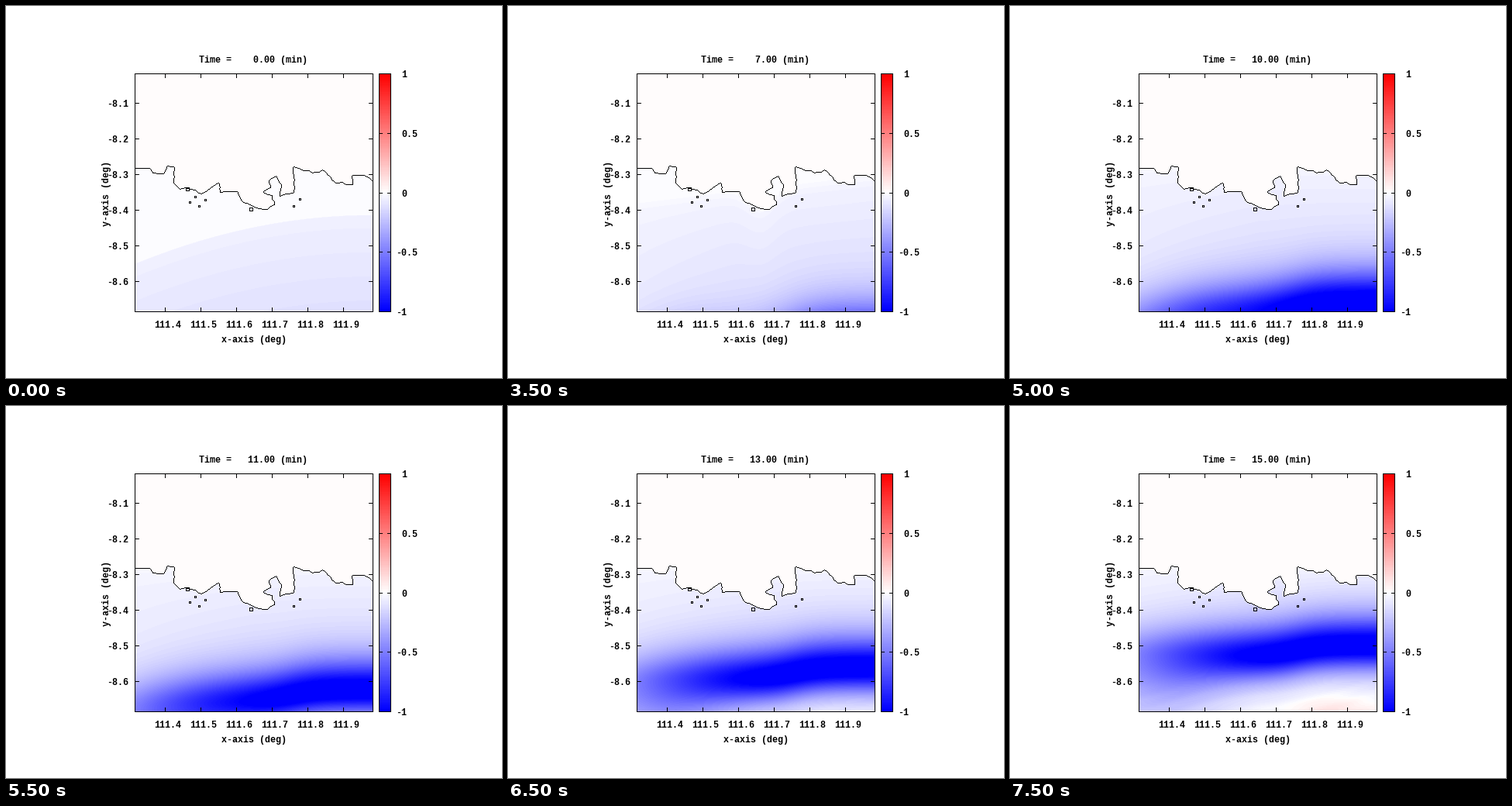
A matplotlib script for the animation above (8000 ms loop, 640 by 480 pixels).

```python
import numpy as np
import matplotlib.pyplot as plt
from matplotlib.animation import FuncAnimation
from matplotlib.path import Path

W, H, DPI = 640, 480, 100
L, R, T, B = 166, 473, 87, 394          # map frame in pixels
CB_L, CB_R = 481, 496                   # colour bar
PX = 72 / DPI

plt.rcParams.update({
    "font.family": "Liberation Mono",
    "font.weight": "bold",
    "font.size": 7 / 0.6 * PX,
})

fig = plt.figure(figsize=(W / DPI, H / DPI), dpi=DPI, facecolor="white")
ax = fig.add_axes([0, 0, 1, 1])

X, Y = np.meshgrid(np.arange(L + 1, R), np.arange(T + 1, B))
U = (X - L) / (R - L)                   # 0 at the west side, 1 at the east


def sigmoid(z):
    return 1 / (1 + np.exp(-np.clip(z, -50, 50)))


def bump(center, width):
    return np.exp(-((U - center) / width) ** 2)


def palette(v):
    """Blue-white-red in 128 steps over -1..1."""
    g = np.clip(np.floor((v + 1) * 64), 0, 127) / 127 * 2 - 1
    return np.stack([1 + np.minimum(g, 0), 1 - np.abs(g), 1 - np.maximum(g, 0)], axis=-1)


def rough(points, step=4, amount=0.7):
    """Subdivide a polyline and shake the new points a little."""
    rng = np.random.default_rng(4)
    out = []
    for p, q in zip(points, points[1:]):
        n = max(1, int(np.hypot(*(q - p)) / step))
        for k in range(n):
            shake = rng.normal(0, amount, 2) if k else 0
            out.append(p + (q - p) * k / n + shake)
    return np.array(out + [points[-1]])


def outline(mask):
    m = np.pad(mask, 1, mode="edge")
    inner = m[:-2, 1:-1] & m[2:, 1:-1] & m[1:-1, :-2] & m[1:-1, 2:]
    return mask & ~inner


# Land: capes and bays of the coast, roughened in between
capes = np.array([
    (166, 209), (185, 209), (189, 215), (203, 216), (208, 206), (217, 207), (216, 228),
    (224, 236), (234, 235), (252, 242), (267, 232), (274, 228), (276, 240), (298, 239),
    (303, 250), (322, 260), (337, 262), (346, 256), (343, 243), (332, 239), (342, 233),
    (340, 224), (348, 219), (355, 230), (353, 245), (372, 240), (371, 207), (395, 215),
    (408, 211), (425, 228), (447, 230), (447, 218), (462, 218), (473, 226)], float)
coast = np.vstack([[(L - 9, 0)], [(L - 9, 209)], rough(capes), [(R + 9, 226)], [(R + 9, 0)]])
land = Path(coast + [0, 0.5]).contains_points(np.c_[X.ravel(), Y.ravel()]).reshape(X.shape)
ink = outline(land)

islands = [(237, 253), (244, 246), (249, 258), (257, 250), (371, 258), (379, 249)]
for x, y, r in [(x, y, 1) for x, y in islands] + [(316, 262, 2), (234, 236, 2)]:
    ink |= np.maximum(abs(X - x), abs(Y - y)) == r

# Leading edges of the first weak wave at 0, 3, 7 and 10 min
EDGES = [
    (0, 269 + 63 * (1 - U) ** 2),
    (3, 290 - 58 * U + 15 * bump(0.53, 0.07) + 100 * np.maximum(U - 0.85, 0)),
    (7, 247 - 35 * U + 25 * bump(0.52, 0.08)),
    (10, 200 + 0 * U),
]
BACK = 306 + 62 * sigmoid((0.42 - U) / 0.09)

# Main trough: position at 15 min, speed per min, depth, rear width, birth time
TROUGH = 322 - 13 * sigmoid((U - 0.66) / 0.06)
SPEED = 14.4 + 3.1 * (1 - U) ** 3
DEPTH = 0.42 + 0.6 * np.sin(np.minimum(U / 0.7, 1) * np.pi / 2)
REAR = 30 + 28 * bump(0, 0.3)
BIRTH = 5.8 + 1.8 * bump(0.44, 0.25)
EAST = np.clip(2 * U, 0, 1)


def front(t):
    for (t0, a), (t1, b) in zip(EDGES, EDGES[1:]):
        if t <= t1:
            return a + (b - a) * (t - t0) / (t1 - t0)
    return EDGES[-1][1]


def field(t):
    u = np.clip((t - 3) / 4, 0, 1)

    # weak leading wave
    d = np.maximum(Y - front(t), 0)
    back = EDGES[0][1] + (BACK - EDGES[0][1]) * min(t / 3, 1)
    early = 0.027 * (Y > back) + (0.0005 + 0.0002 * t) * np.maximum(Y - back, 0)
    late = (0.06 + 0.04 * EAST) * (1 - np.exp(-d / 90)) * (1 + 0.03 * max(t - 9, 0))
    lead = 0.027 * np.clip(d / (1 + 17 * u), 0, 1) + early * (1 - u) + late * u

    # strong trough moving up
    s = TROUGH + SPEED * (15 - t) - Y
    width = np.where(s > 0, 36 + 0.5 * (15 - t), REAR)
    trough = DEPTH * sigmoid((t - BIRTH) / 1.1) / np.cosh(s / width) ** 2

    # calm water, ripples and crest behind it
    lead = lead * (1 - EAST * sigmoid(-(s + 25) / 10))
    crest = 0.14 * bump(0.8, 0.2) * sigmoid(-(s + 68) / 8)
    ripple = 0.008 * np.sin((Y + 0.22 * X + 4 * np.sin(X / 35)) / 2.6) * sigmoid(-(s + 42) / 5)
    return crest + ripple - lead - trough


def picture(t):
    rgb = palette(np.where(land, 0, field(t)))
    rgb[ink] = 0
    return rgb


def line(xs, ys):
    ax.plot(xs, ys, color="black", lw=PX, antialiased=False, snap=True, zorder=4)


def box(l, t, r, b):
    line([l, r, r, l, l], [t, t, b, b, t])


def ticks_x(x, size):
    line([x, x], [T, T + size])
    line([x, x], [B - size, B])


def ticks_y(y, l, r, size):
    line([l, l + size], [y, y])
    line([r - size, r], [y, y])


def text(x, y, s, **kw):
    return ax.text(x, y, s, ha="left", va="baseline", zorder=5, **kw)


def show(rgb, l, t, r, b):
    return ax.imshow(rgb, extent=(l, r, b, t), interpolation="nearest",
                     aspect="auto", zorder=1)


sea = show(picture(0), L + 1, T + 1, R, B)

# Frame, ticks and labels
box(L, T, R, B)
for i in range(6):
    x, y = 205 + 46 * i, 125 + 46 * i
    ticks_x(x, 5)
    ticks_y(y, L, R, 5)
    text(x - 14, 415, f"{111.4 + 0.1 * i:.1f}")
    text(130, y + 5, f"{-8.1 - 0.1 * i:.1f}")
text(278, 434, "x-axis (deg)")
text(133, 284, "y-axis (deg)", rotation=90, rotation_mode="anchor")

# Colour bar
show(palette(np.linspace(0.999, -1, B - T)[:, None]), CB_L, T, CB_R, B)
box(CB_L, T, CB_R, B)
for i in range(5):
    v = 1 - i / 2
    y = T + round(i * (B - T) / 4)
    ticks_y(y, CB_L, CB_R, 4)
    text(503 if v < 0 else 510, y + 5, f"{v:g}")

ax.set_xlim(0, W)
ax.set_ylim(H, 0)
ax.axis("off")
title = text(249, 73, "")


def update(minute):
    sea.set_data(picture(minute))
    title.set_text(f"Time ={minute:8.2f} (min)")
    return sea, title


anim = FuncAnimation(fig, update, frames=16, interval=500, repeat=True, repeat_delay=0)
plt.show()
```
